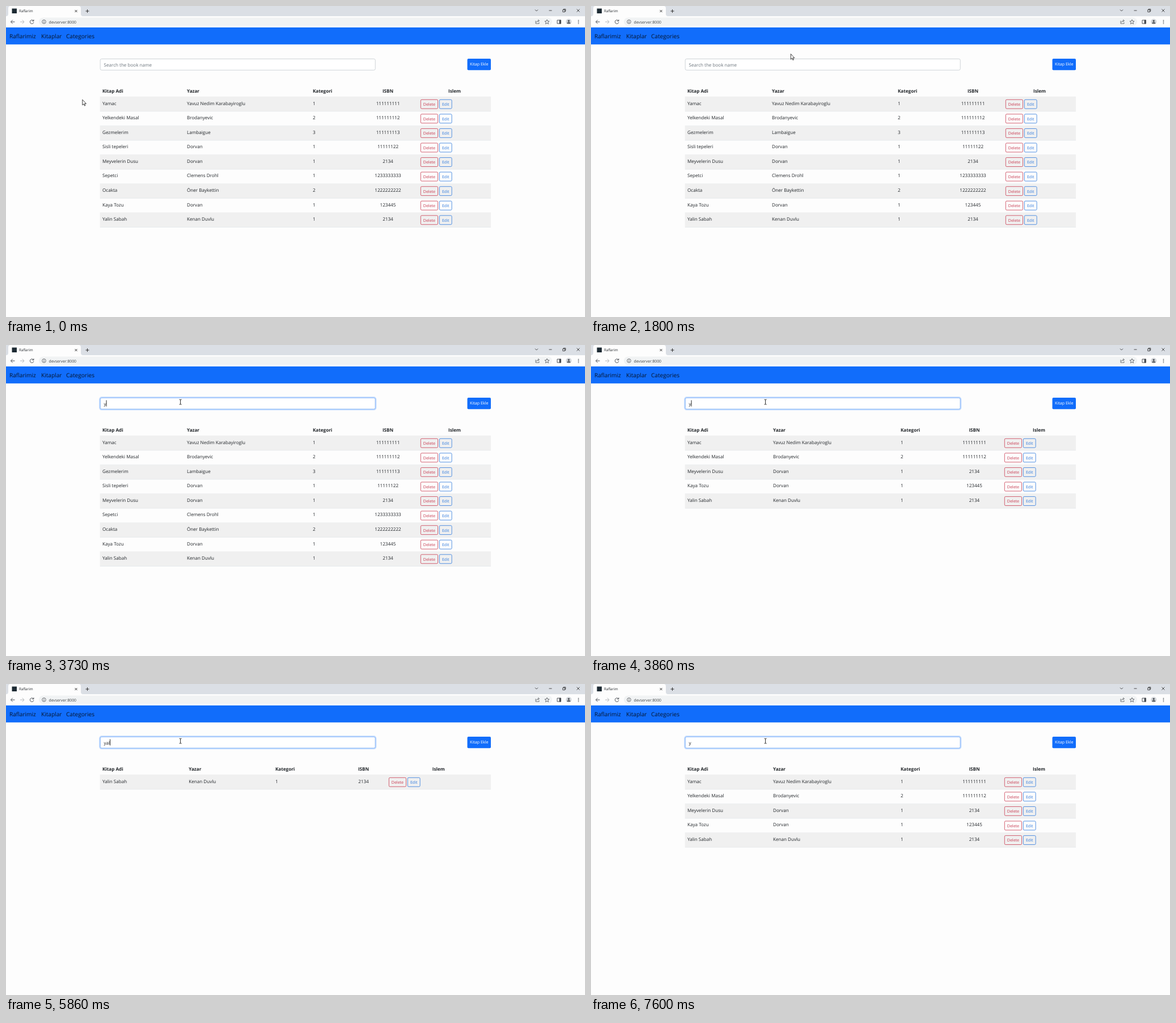
Write an HTML page that moves like this. It is 1021 px wide and 549 px high and loops after 8000 ms.

```html
<!DOCTYPE html>
<html lang="tr">
<head>
<meta charset="utf-8">
<title>Raflarim</title>
<style>
  html, body { margin: 0; width: 100%; height: 100%; overflow: hidden; background: #fdfdfd; }
  svg { display: block; width: 1021px; height: 549px; }
  text { font: 8.1px "Open Sans", "Noto Sans", sans-serif; fill: #212529; text-rendering: geometricPrecision; white-space: pre; }
  .head { font-weight: 700; }
  .mid { text-anchor: middle; }
  .small { font-size: 7px; }
  .nav { font-size: 10.1px; fill: #07162e; }
  .hint { fill: #6c757d; }
  .icon { fill: none; stroke: #4b4f54; stroke-width: 1; }
</style>
</head>
<body>
<svg viewBox="0 0 1021 549">
  <rect width="1021" height="549" fill="#fdfdfd"/>

  <!-- browser frame -->
  <rect width="1021" height="18" fill="#dbdfe5"/>
  <path d="M0 18q4 0 4-4V4q0-4 4-4H128q4 0 4 4V14q0 4 4 4Z" fill="#fdfdfd"/>
  <rect x="10.5" y="4.5" width="8.5" height="8.5" fill="#1d2a33"/>
  <text x="23" y="11.2" style="font-size:6.3px">Raflarim</text>
  <g class="icon">
    <path d="M121.5 7l4 4m0-4l-4 4M140.500 9h6m-3-3v6" stroke="#333"/>
    <path d="M933 6.500l2.500 2.500l2.500-2.500M957.500 8h5M1006.500 5.500l5 5m0-5l-5 5" stroke="#222" stroke-width=".8"/>
    <path d="M981.800 6.800h3.700v3.700h-3.700zM983 6.500v-1h3.800v3.800h-1" stroke="#222" stroke-width=".8"/>
    <path d="M15.500 28H8.500m3.200-3.300L8.500 28l3.200 3.300"/>
    <path d="M25 28h7m-3.200-3.300L32 28l-3.200 3.300" stroke="#b4b7bb"/>
    <path d="M48.300 26A3.300 3.300 0 1 0 48.900 28.700M48.900 24v2.600h-2.600"/>
  </g>
  <rect x="58" y="20.500" width="905" height="14.500" rx="7.250" fill="#f1f3f4"/>
  <g class="icon" stroke-width=".8">
    <circle cx="67" cy="27.800" r="3.300" stroke-width=".8"/>
    <path d="M67 27.300v2.300M67 25.600v.8"/>
    <path d="M934 26v5h6v-2M935.500 29q.5-3 4-3m-1.500-2l2.500 2l-2.500 2" stroke-width=".8"/>
    <path d="M954 24l1.100 2.700l2.900.2l-2.200 1.900l.7 2.900l-2.500-1.600l-2.500 1.600l.7-2.900l-2.200-1.900l2.900-.2z" stroke-width=".8"/>
    <path d="M972 25h6.500v6H972z"/>
    <path d="M976 25h2.500v6H976z" fill="#4b4f54"/>
  </g>
  <circle cx="992.300" cy="27.800" r="5" fill="#d3d6da"/>
  <path d="M989.300 31q0-2.500 3-2.500t3 2.500z" fill="#4b4f54"/>
  <circle cx="992.300" cy="26.300" r="1.600" fill="#4b4f54"/>
  <path d="M1009.500 24.800v7" stroke="#4b4f54" stroke-width="1.500" stroke-dasharray="1.400 1.300"/>
  <text x="75.500" y="30.500" style="font-size:6.800px;fill:#3c4043">devserver:8000</text>

  <!-- page -->
  <rect y="37.800" width="1021" height="30" fill="#116dfb"/>
  <text class="nav" x="6" y="57">Raflarimiz</text>
  <text class="nav" x="62" y="57">Kitaplar</text>
  <text class="nav" x="106" y="57">Categories</text>
  <rect x="166.200" y="93.400" width="485" height="19.800" rx="2.500" fill="#fff" stroke="#c3c9cf" stroke-width=".8"/>
  <g id="focus" opacity="0">
    <rect x="165.200" y="92.400" width="487" height="21.800" rx="3.500" fill="none" stroke="#c2dbfe" stroke-width="2.200"/>
    <rect x="166.200" y="93.400" width="485" height="19.800" rx="2.500" fill="none" stroke="#86b7fe" stroke-width=".9"/>
  </g>
  <text id="hint" class="hint" x="172.500" y="106.500">Search the book name</text>
  <text id="typed" x="172.500" y="106.500"></text>
  <rect id="caret" y="97.500" width=".9" height="11" fill="#111"/>
  <rect x="813.500" y="93" width="41.500" height="20.200" rx="2" fill="#116dfb"/>
  <text class="mid" x="834.300" y="104.500" style="font-size:7.200px;fill:#fff">Kitap Ekle</text>
  <g id="tables"></g>

  <path id="arrow" d="M0 0V9.600L2.200 7.600L3.700 10.900L5.100 10.300L3.600 7.100H6.600Z" fill="#fff" stroke="#111" stroke-width=".8"/>
  <path id="beam" d="M-2-4.300H-.5L0-3.900L.5-4.300H2M0-3.900V3.900M-2 4.300H-.5L0 3.900L.5 4.300H2" fill="none" stroke="#111" stroke-width=".9"/>
</svg>

<script>
const LOOP = 8000;
const $ = id => document.getElementById(id);

const books = [
  ["Yamac", "Yavuz Nedim Karabayiroglu", 1, "111111111"],
  ["Yelkendeki Masal", "Brodanyevic", 2, "111111112"],
  ["Gezmelerim", "Lambaigue", 3, "111111113"],
  ["Sisli tepeleri", "Dorvan", 1, "11111122"],
  ["Meyvelerin Dusu", "Dorvan", 1, "2134"],
  ["Sepetci", "Clemens Drohl", 1, "1233333333"],
  ["Ocakta", "Öner Baykettin", 2, "1222222222"],
  ["Kaya Tozu", "Dorvan", 1, "123445"],
  ["Yalin Sabah", "Kenan Duvlu", 1, "2134"]
];

// column positions per query: author, category, isbn centre, action centre, buttons
const layouts = {
  "":  [319, 541, 673.5, 791, 731],
  y:   [321, 546, 676, 790, 729],
  ya:  [321, 546, 676, 790, 729],
  yal: [322.3, 475, 630.5, 762.7, 675]
};

const label = (x, y, str, cls = "") => `<text x="${x}" y="${y}" class="${cls}">${str}</text>`;

function button(x, y, width, str, color) {
  return `<rect x="${x + .3}" y="${y}" width="${width}" height="15.9" rx="1.8" fill="none" stroke="${color}" stroke-width=".8"/>` +
    `<text class="small mid" x="${x + width / 2 + .3}" y="${y + 10.8}" style="fill:${color}">${str}</text>`;
}

function table(query) {
  const [author, category, isbn, action, buttons] = layouts[query];
  const top = 160.4, pitch = 25.57;
  const line = y => `<path d="M165.700 ${y}H855" stroke="#dee2e6" stroke-width=".6"/>`;
  let out = label(170, 152.8, "Kitap Adi", "head") + label(author, 152.8, "Yazar", "head") +
    label(category, 152.8, "Kategori", "head") + label(isbn, 152.8, "ISBN", "head mid") +
    label(action, 152.8, "Islem", "head mid") + line(top);
  books.filter(b => b[0].toLowerCase().includes(query)).forEach((b, i) => {
    const y = top + i * pitch, base = y + 14.2;
    if (i % 2 === 0) out += `<rect x="165.700" y="${y}" width="689.300" height="${pitch}" fill="#f0f0f0"/>`;
    out += line(y + pitch) + label(170, base, b[0]) + label(author, base, b[1]) +
      label(category, base, b[2]) + label(isbn, base, b[3], "mid") +
      button(buttons, y + 4.9, 30.2, "Delete", "#c93a50") +
      button(buttons + 33, y + 4.9, 21.8, "Edit", "#2a76dc");
  });
  return `<g data-query="${query}">${out}</g>`;
}

$("tables").innerHTML = Object.keys(layouts).map(table).join("");
const groups = [...$("tables").children];

const typing = [[0, ""], [3660, "y"], [4860, "ya"], [5530, "yal"], [6930, "ya"], [7460, "y"]];
const results = [[0, ""], [3800, "y"], [5330, "ya"], [5860, "yal"], [7400, "ya"], [7530, "y"]];
const caretOn = [[0, 0], [2200, 1], [2730, 0], [3260, 1], [4200, 0], [4730, 1], [5390, 0],
  [5530, 1], [6060, 0], [6600, 1], [7260, 0]];
const pointer = [[0, 134.8, 165.3], [200, 127.8, 179.3], [1000, 127.8, 179.3], [1800, 352.3, 84.6],
  [2060, 300, 104], [2200, 307.6, 100.6], [LOOP, 307.6, 100.6]];

const current = (steps, t) => steps.filter(s => s[0] <= t).pop()[1];

function place(t) {
  const i = pointer.findIndex(p => p[0] > t);
  const a = pointer[i - 1], b = pointer[i];
  const k = (t - a[0]) / (b[0] - a[0]);
  const e = k * k * (3 - 2 * k);
  return [a[1] + (b[1] - a[1]) * e, a[2] + (b[2] - a[2]) * e];
}

const show = (el, on) => el.setAttribute("visibility", on ? "visible" : "hidden");

function render(t) {
  const word = current(typing, t), query = current(results, t);
  $("typed").textContent = word;
  show($("hint"), !word);
  $("caret").setAttribute("x", 172.5 + (word ? $("typed").getComputedTextLength() : 0));
  show($("caret"), current(caretOn, t));
  $("focus").setAttribute("opacity", Math.max(0, Math.min(1, (t - 2200) / 150)));
  groups.forEach(g => show(g, g.dataset.query === query));

  const [x, y] = place(t), inField = t > 1900;
  for (const id of ["arrow", "beam"]) {
    $(id).setAttribute("transform", `translate(${x} ${y})`);
    show($(id), (id === "beam") === inField);
  }
}

const start = performance.now();
function tick() {
  render((performance.now() - start) % LOOP);
  requestAnimationFrame(tick);
}
tick();
</script>
</body>
</html>
```
